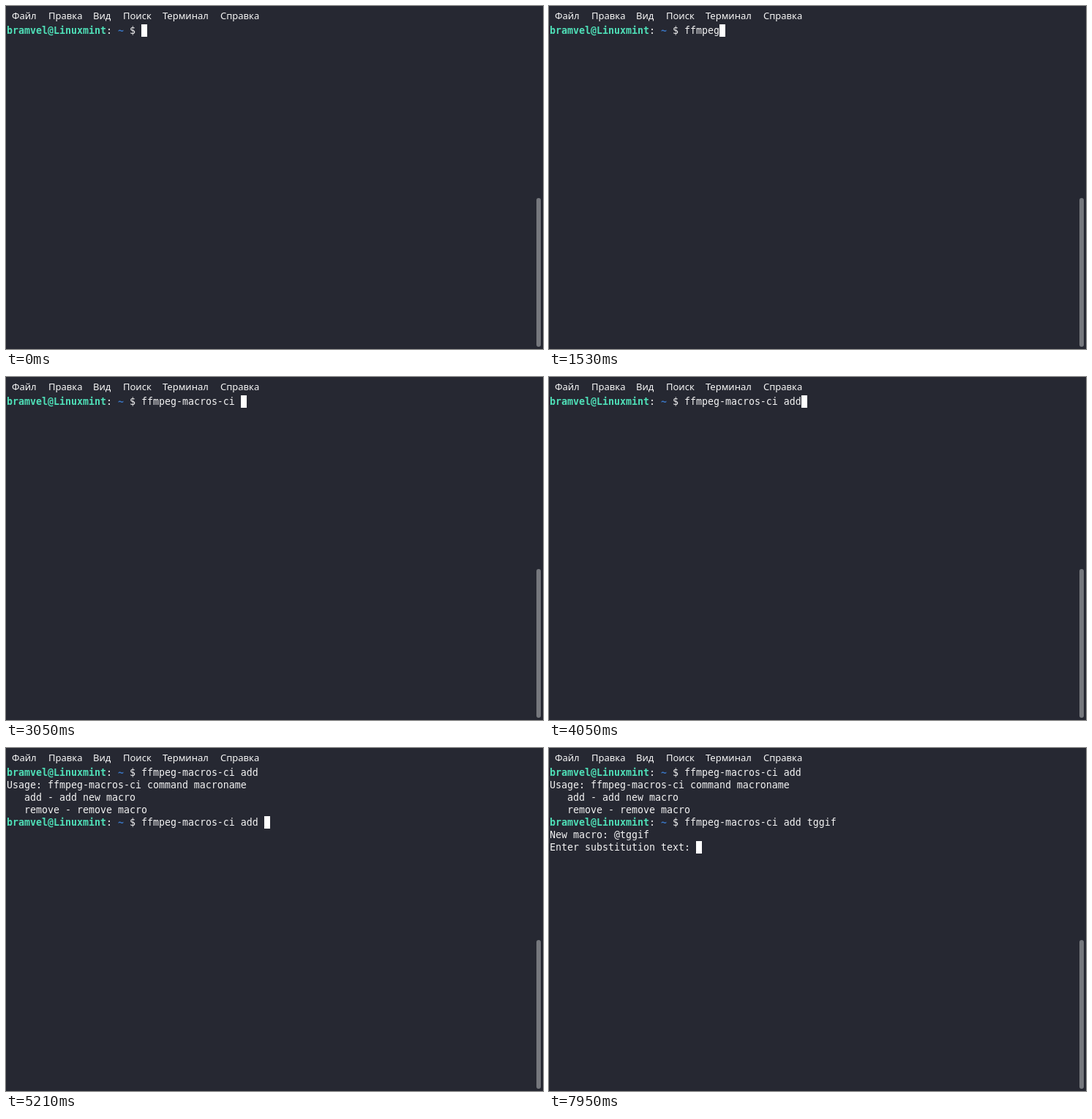
These frames come from a looping animation (734x468 px, 8 s). An HTML page:

```html
<!DOCTYPE html>
<html lang="ru">
<head>
<meta charset="utf-8">
<title>Terminal</title>
<style>
  html, body { margin: 0; width: 100%; height: 100%; overflow: hidden; background: #262832; }
  #stage { position: relative; width: 734px; height: 468px; overflow: hidden; background: #262832; }
  #menu span { position: absolute; top: 3px; font: 13px/20px "Noto Sans", "Open Sans", sans-serif; color: #f6f6f6; white-space: pre; }
  #screen { position: absolute; left: 1px; top: 25px; margin: 0; font: 13.29px/17px "DejaVu Sans Mono", monospace; color: #f2f2f2; }
  #screen b { color: #4fe0b8; }
  #screen b.path { color: #3a76c4; }
  #cursor { position: absolute; width: 8px; height: 17px; background: #fff; }
  #scrollbar { position: absolute; left: 725px; top: 262px; width: 6px; height: 203px; border-radius: 3px; background: #75777d; }
</style>
</head>
<body>
<div id="stage">
  <div id="menu"></div>
  <pre id="screen"></pre>
  <div id="cursor"></div>
  <div id="scrollbar"></div>
</div>
<script>
const LOOP = 8000, CELL = 8, LINE = 17, LEFT = 1, TOP = 25;
const PROMPT = 'bramvel@Linuxmint: ~ $ ';
const PROMPT_HTML = '<b>bramvel@Linuxmint</b>: <b class="path">~</b> $ ';
const USAGE = `
Usage: ffmpeg-macros-ci command macroname
   add - add new macro
   remove - remove macro
`;

// Each entry appends its text to the screen at the given time in ms.
const output = [
  [0, PROMPT],
  [420, 'f'], [580, 'f'], [690, 'm'], [840, 'p'], [950, 'e'], [1060, 'g'],
  [1580, '-'], [2050, 'm'], [2310, 'a'], [2580, 'c'],
  [2890, 'ros-ci '],
  [3530, 'a'], [3690, 'd'], [3840, 'd'],
  [4160, USAGE + PROMPT],
  [4630, 'ffmpeg-macros-ci add'], [5000, ' '],
  [6000, 't'], [6110, 'g'], [6470, 'g'], [6950, 'i'], [7160, 'f'],
  [7580, '\nNew macro: @tggif\nEnter substitution text: '],
];

const menuItems = [['Файл', 8], ['Правка', 58], ['Вид', 119], ['Поиск', 160], ['Терминал', 214], ['Справка', 293]];
const byId = id => document.getElementById(id);
byId('menu').innerHTML = menuItems.map(([label, x]) => `<span style="left:${x}px">${label}</span>`).join('');

let shown = null;
function draw(time) {
  const text = output.filter(([start]) => start <= time).map(([, part]) => part).join('');
  if (text === shown) return;
  shown = text;
  byId('screen').innerHTML = text.replaceAll(PROMPT, PROMPT_HTML);
  const lines = text.split('\n');
  byId('cursor').style.left = LEFT + lines.at(-1).length * CELL + 'px';
  byId('cursor').style.top = TOP + (lines.length - 1) * LINE + 'px';
}

function tick() {
  draw(performance.now() % LOOP);
  requestAnimationFrame(tick);
}
tick();
</script>
</body>
</html>
```
